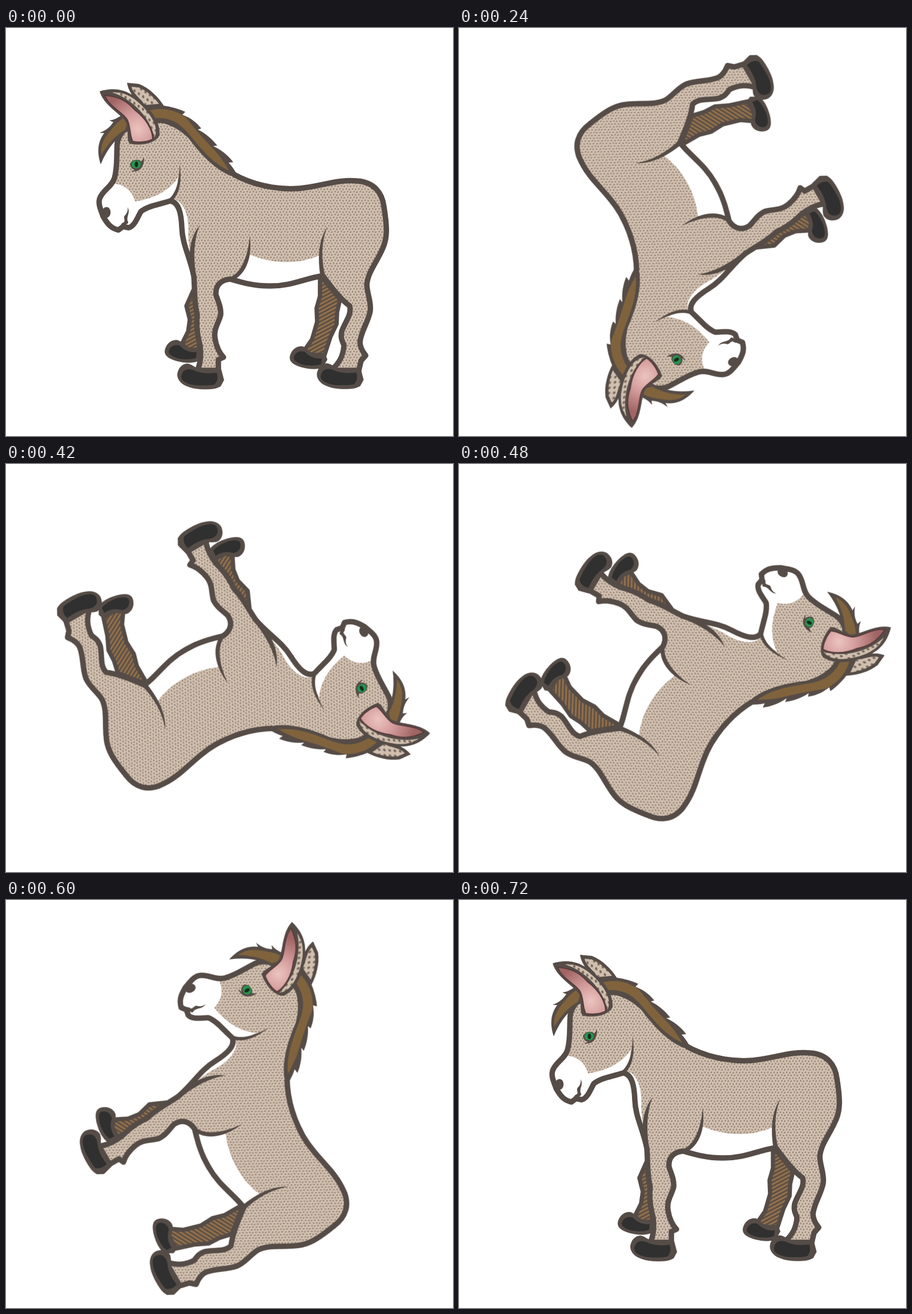
An HTML page for the animation above (780 ms loop, 783 px wide and 715 px high).

```html
<!DOCTYPE html>
<html lang="en">
<head>
<meta charset="utf-8">
<title>Tumbling donkey</title>
<style>
  html, body { margin: 0; width: 100%; height: 100%; overflow: hidden; background: #fff; }
  svg { display: block; width: 783px; height: 715px; }
  .ink { fill: #564c47; }
  .white { fill: #fff; }
  .mane { fill: #80633c; }
  .horn { fill: #303030; }
  .line { fill: none; stroke: #564c47; stroke-width: 9.5; stroke-linejoin: round; stroke-linecap: round; }
  .coat { fill: url(#coat); }
  .shade { fill: url(#stripes); stroke-width: 7.5; }
  #donkey { transform-origin: 401.7px 369.7px; animation: tumble 780ms step-end infinite; }
  /* thirteen 60 ms holds, with a slight wobble of the pivot */
  @keyframes tumble {
    0% { transform: rotate(0deg); }
    7.692% { transform: translate(-6px, 3px) rotate(-30deg); }
    15.384% { transform: translate(-12px, 7px) rotate(-60deg); }
    23.076% { transform: translate(-1px, 1px) rotate(-90deg); }
    30.769% { transform: translate(6px, -4px) rotate(-120deg); }
    38.461% { transform: translate(3px, 13px) rotate(-150deg); }
    46.153% { transform: rotate(-180deg); }
    53.846% { transform: translate(6px, -3px) rotate(-210deg); }
    61.538% { transform: translate(12px, -7px) rotate(-240deg); }
    69.23% { transform: translate(1px, -1px) rotate(-270deg); }
    76.923% { transform: translate(-6px, 4px) rotate(-300deg); }
    84.615% { transform: translate(-3px, -13px) rotate(-330deg); }
    92.307%, 100% { transform: rotate(-360deg); }
  }
</style>
</head>
<body>
<svg viewBox="0 0 783 715">
  <defs>
    <pattern id="coat" width="11" height="10" patternUnits="userSpaceOnUse">
      <rect width="11" height="10" fill="#d0bfaf"/>
      <g fill="#8b7a6b">
        <ellipse cx="2" cy="2" rx="1" ry="1.6" transform="rotate(25 2 2)"/>
        <ellipse cx="7.5" cy="2.8" rx="1" ry="1.6" transform="rotate(-20 7.5 2.8)"/>
        <ellipse cx="4.6" cy="6.8" rx="1" ry="1.6" transform="rotate(15 4.6 6.8)"/>
        <ellipse cx="9.6" cy="7.6" rx="1" ry="1.6" transform="rotate(35 9.6 7.6)"/>
      </g>
    </pattern>
    <pattern id="spots" width="12" height="14" patternUnits="userSpaceOnUse" patternTransform="rotate(-15)">
      <rect width="12" height="14" fill="#d0bfaf"/>
      <g fill="#75665a">
        <ellipse cx="3" cy="3.5" rx="1.9" ry="2.7"/>
        <ellipse cx="9" cy="10.5" rx="1.9" ry="2.7"/>
      </g>
    </pattern>
    <pattern id="stripes" width="6" height="6" patternUnits="userSpaceOnUse" patternTransform="rotate(-28)">
      <rect width="6" height="6" fill="#594c42"/>
      <rect width="6" height="3.3" fill="#92714d"/>
    </pattern>
    <radialGradient id="pink" gradientUnits="userSpaceOnUse" cx="231" cy="177" r="66">
      <stop offset="0" stop-color="#ecc4bf"/>
      <stop offset=".45" stop-color="#d39b9b"/>
      <stop offset="1" stop-color="#a06464"/>
    </radialGradient>
    <path id="body" d="M400 257C440 279 490 286 530 279C560 274 588 265 615 268C645 270 659 289 662 313C668 350 668 368 660 386C650 410 634 427 632 450C633 468 640 479 638 496C634 517 621 533 620 551C621 564 627 569 630 574L622 583L618 600H569C585 587 591 573 592 556C588 547 586 542 588 532C594 514 606 503 602 487C588 477 570 455 555 434C520 440 500 452 465 452C435 453 410 445 393 440C376 441 366 452 368 468C372 481 377 489 376 503C372 518 364 526 366 543C368 559 375 571 381 577L372 581L372 600H335C341 588 342 573 340 556C335 538 333 520 335 503C329 480 331 455 329 435C322 400 309 380 308 350C307 325 303 306 288 303C266 310 248 312 236 322C229 335 225 347 215 350L205 348L197 354C183 351 177 342 170 330C166 318 161 309 164 299C169 284 185 279 190 263C196 242 193 220 195 201C199 178 230 152 262 160C320 164 340 220 400 257Z"/>
    <g id="hoof">
      <path class="ink" d="M300 607C301 597 308 588 318 588C328 590 333 597 344 600C358 602 367 600 377 598L382 617L376 628C368 633 355 634 340 633C316 631 300 622 300 607Z"/>
      <path class="horn" d="M307 610C309 599 317 596 327 599C342 606 357 606 369 604C372 613 370 620 365 625C352 627 336 627 325 625C313 622 306 617 307 610Z"/>
    </g>
    <g id="farHoof">
      <path class="ink" d="M278 567C279 555 289 545 301 547C309 550 312 558 322 561L340 559L344 570L336 584C326 588 312 587 300 584C286 580 278 575 278 567Z"/>
      <path class="horn" d="M285 567C287 557 297 553 305 557C313 566 324 569 334 568L333 578C322 582 310 581 301 579C291 576 285 572 285 567Z"/>
    </g>
  </defs>

  <g id="donkey">
    <g id="farLegs">
      <path class="line shade" d="M328 460L316 487L322 511L319 532L308 554L318 563L338 566V470Z"/>
      <path class="line shade" d="M550 440L550 470L544 491L545 515L536 546L522 566L536 573L558 573L568 542L579 519L580 498L585 476L556 440Z"/>
      <use href="#farHoof"/>
      <use href="#farHoof" x="219" y="11"/>
    </g>

    <use href="#body" class="coat"/>
    <g class="white">
      <path d="M190 273C207 274 222 286 226 304C257 300 287 285 301 262C300 280 296 291 287 301C264 308 244 311 235 321C228 334 224 346 214 349L204 347L197 352C184 349 178 340 171 329C167 318 163 309 165 299C170 285 182 281 190 273Z"/>
      <path d="M291 300C311 300 322 330 319 362C320 380 323 393 322 407C316 388 310 370 309 350C308 325 305 307 291 300Z"/>
      <path d="M427 397C465 413 510 416 550 398C549 410 550 420 553 433C518 439 500 451 465 451C438 452 418 445 398 440C417 426 424 413 427 397Z"/>
    </g>
    <use href="#body" class="line"/>

    <g id="creases" class="ink">
      <path d="M304 238C309 270 304 293 287 306L283 302C298 290 304 270 304 238Z"/>
      <path d="M339 346C329 371 328 402 333 436L327 436C317 398 322 367 339 346Z"/>
      <path d="M427 364C432 401 421 433 394 444L389 438C413 431 424 399 427 364Z"/>
      <path d="M563 348C552 375 552 406 559 434L551 437C545 401 548 370 563 348Z"/>
      <path d="M213 314C219 325 209 331 214 340C215 345 207 343 206 347C205 353 201 357 195 358L193 353C202 352 199 344 205 341C210 339 206 335 207 330C212 325 214 321 213 314Z"/>
      <path d="M170 317C175 311 182 314 183 321C184 329 179 334 174 332C169 328 168 322 170 317Z"/>
    </g>

    <g id="eye">
      <path class="ink" d="M217 239C220 231 231 228 237 234L242 227C242 243 235 254 218 251L226 249C220 247 218 243 217 239Z"/>
      <ellipse cx="228" cy="239" rx="8" ry="7" fill="#23964c"/>
      <ellipse cx="228.5" cy="239" rx="3" ry="5" fill="#152a1d"/>
    </g>

    <use href="#hoof"/>
    <use href="#hoof" x="244.500" y="-.5"/>

    <g id="backEar">
      <path class="ink" d="M212 96L233 98C252 106 266 120 277 137L240 140C228 126 215 115 212 96Z"/>
      <path fill="url(#spots)" d="M220 103L232 104C248 111 259 121 268 133L243 135C234 121 222 115 220 103Z"/>
    </g>

    <g id="hair">
      <path class="ink" d="M166 239C160 220 159 202 172 184L164 184C172 180 180 177 188 165L181 162C193 161 199 154 210 149L218 160L215 180C194 191 178 210 166 239Z"/>
      <path class="mane" d="M167 222C165 205 172 193 181 182L191 170C197 164 203 158 209 157L212 165L209 178C191 189 178 203 167 222Z"/>
      <path class="ink" d="M238 141C262 131 292 137 314 147L309 152C325 158 335 167 342 176L336 178C352 186 362 196 370 206L363 207C378 214 390 224 398 235L390 236C396 242 400 249 405 257L393 259C360 244 338 217 319 192C304 172 286 164 260 167Z"/>
      <path class="mane" d="M244 147C268 137 298 143 315 157C334 181 347 195 362 211C375 224 383 237 391 250C363 238 341 211 324 190C305 166 288 156 258 158Z"/>
    </g>

    <g id="frontEar">
      <path class="ink" d="M164 111C187 104 206 107 224 119C252 138 271 163 269 188C262 201 242 207 217 203C210 195 216 179 210 165C200 149 172 137 164 111Z"/>
      <path fill="url(#spots)" d="M186 113C208 111 225 123 239 137C258 157 268 177 260 192C257 176 246 155 229 139C215 126 202 118 186 113Z"/>
      <path fill="url(#pink)" stroke="#563c3c" stroke-width="2" d="M173 118C197 120 211 127 226 144C246 159 257 179 257 195C247 200 235 201 222 199C216 188 219 174 212 160C203 146 181 139 173 118Z"/>
    </g>
  </g>
</svg>
</body>
</html>
```
